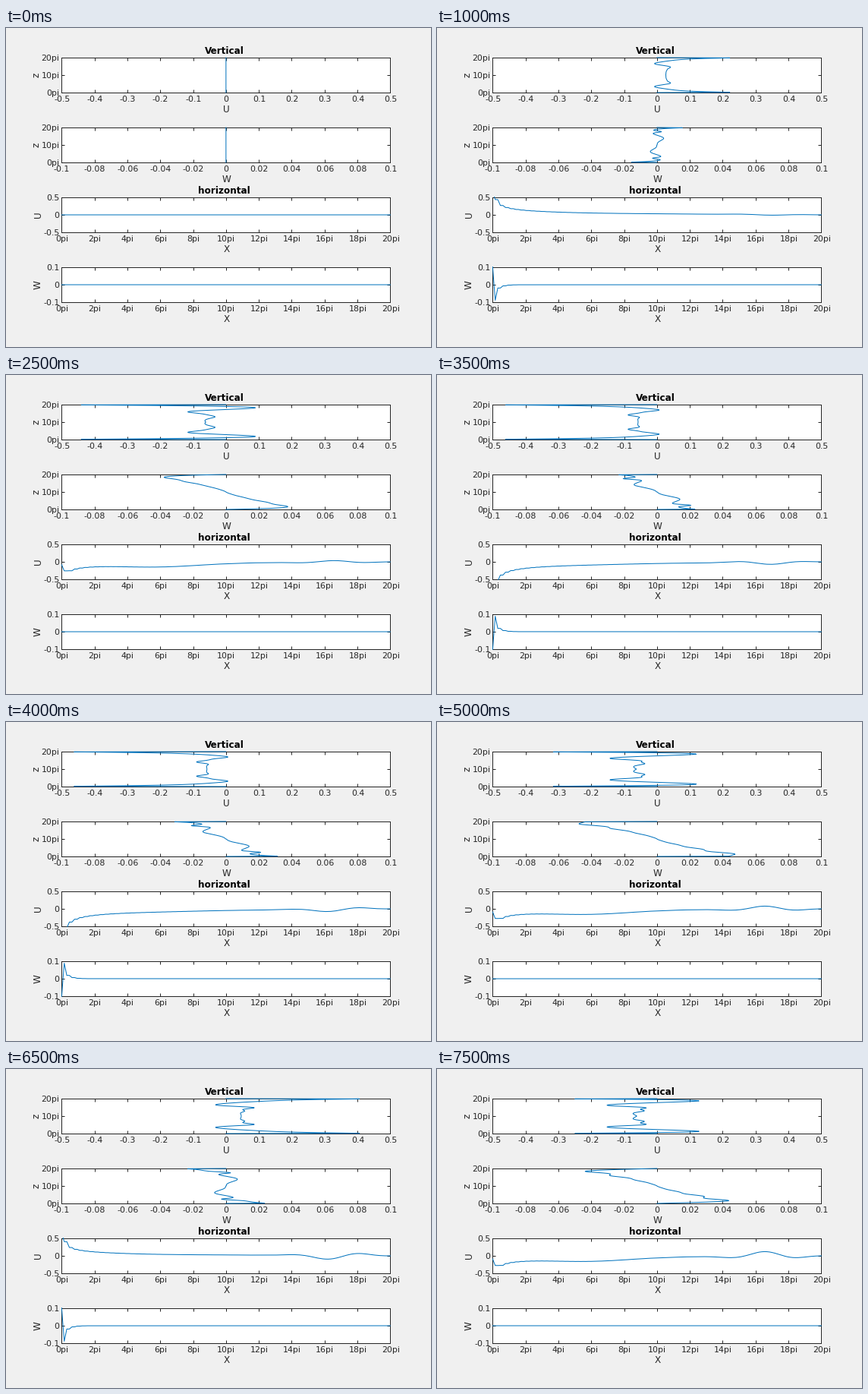
Animation of 560x420 px, one loop 8 s. Source, as a matplotlib script:

```python
import numpy as np
import matplotlib.pyplot as plt
from matplotlib.animation import FuncAnimation

W, H, DPI = 560, 420, 100
PX = 72 / DPI
INK, BLUE = '#262626', '#0072BD'
STEPS, INTERVAL, N = 16, 500, 128
LEFT, RIGHT = 73.3, 506.4
PERIOD = 10

plt.rcParams['font.family'] = 'DejaVu Sans'

index = np.arange(N)
z = np.linspace(0, 1, N)
x = np.linspace(0, 20, N)
wall = np.minimum(z, 1 - z)
side = np.where(z < 0.5, 1, -1)
inside = (wall > 0).astype(float)


def bump(at, centre, width):
    return np.exp(-((at - centre) / width) ** 2)


def wave(at, crest, length):
    return np.cos(2 * np.pi * (at - crest) / length)


def phase(t):
    """Forcing, its second harmonic and the spin-up from rest."""
    a = 2 * np.pi * t / PERIOD
    return np.sin(a), np.cos(a) ** 2, np.tanh(t / 3)


def vertical_u(t):
    force, twice, grown = phase(t)
    odd = (0.5 * np.exp(-wall / 0.035) + 0.055 - 0.075 * bump(wall, 0.16, 0.06)
           + 0.03 * bump(wall, 0.28, 0.05))
    crest = 0.05 + 0.3 / (t + 1)
    even = (0.33 * np.exp(-wall / 0.13) * wave(wall, crest, 0.25)
            - 0.3 * np.exp(-wall / 0.02) - 0.06)
    ripple = 0.0017 * t * wave(wall, 0.25, 0.12) * bump(wall, 0.26, 0.1)
    return inside * (grown * (force * odd + twice * even) + ripple)


def vertical_w(t):
    force, twice, grown = phase(t)
    core = 1 - 2 * wall
    even = 0.052 * core ** 1.3 * (1 - np.exp(-wall / 0.03))
    odd = -0.011 * bump(wall, 0.3, 0.1) - 0.012 * bump(wall, 0.12, 0.03)
    beat = -0.045 * np.cos(np.pi * t / PERIOD) * np.exp(-wall / 0.035)
    ripple = 0.0005 * t * twice * core ** 2 * wave(wall, 0.085, 0.13)
    total = grown * ((0.15 + 0.85 * twice) * even + force * odd + beat) + ripple
    return side * inside * total


def horizontal_u(t):
    force, twice, grown = phase(t)
    # Values come in pairs, which gives the small stairs near the inlet.
    pair = ((index + 1) // 2 * 2 - 0.5) * x[1]
    pair[0] = 0.12
    decay = 0.75 / np.sqrt(pair) * np.clip(1 - pair / 20, 0, 1)
    drift = np.where(index > 0, np.minimum(decay, 1), 0.3)
    near = 0.33 * force * decay - grown * (0.05 + 0.22 * twice) * drift
    trough = -0.1 * grown * twice * bump(x, 6, 3.5)
    far = (0.01 * t * wave(x + t, 16.5, PERIOD / 2) * bump(x, 17, 2.3)
           * (1 - (x / 20) ** 12))
    return near + trough + far


def horizontal_w(t):
    decay = -0.018 * 0.35 ** ((index - 2) // 2)
    decay[:2] = 0.1, -0.085
    return 1.1 * phase(t)[0] * decay


fig = plt.figure(figsize=(W / DPI, H / DPI), dpi=DPI, facecolor='#f0f0f0')


def text(px, py, s, size=12, **kw):
    kw = {'ha': 'center', 'color': INK, **kw}
    fig.text(px / W, 1 - py / H, s, fontsize=size * PX, va='baseline',
             rotation_mode='anchor', **kw)


def panel(row, xlim, ylim, xnames, ynames, xlabel, ylabel, title=None):
    top = 39 + 92 * row
    ax = fig.add_axes([LEFT / W, 1 - (top + 46) / H, (RIGHT - LEFT) / W, 46 / H])
    ax.set(xlim=xlim, ylim=ylim, xticks=np.linspace(*xlim, len(xnames)),
           yticks=np.linspace(*ylim, len(ynames)))
    ax.tick_params(direction='in', top=True, right=True, length=4.3 * PX, width=PX,
                   color=INK, labelbottom=False, labelleft=False)
    for spine in ax.spines.values():
        spine.set(color=INK, linewidth=PX)
    for px, s in zip(np.linspace(LEFT, RIGHT, len(xnames)), xnames):
        text(px + 0.3, top + 58, s, 11)
    for py, s in zip(np.linspace(top + 50, top + 4, len(ynames)), ynames):
        text(70.5, py, s, 11, ha='right')
    text(290.3, top + 71.6, xlabel)
    text(43.5 if ylabel == 'z' else 46, top + 23, ylabel, rotation=90)
    if title:
        text(287.5, top - 5, title, weight='bold', color='black')
    line, = ax.plot([], [], color=BLUE, lw=PX, snap=False, zorder=3)
    line.set_clip_box(ax.bbox.padded(0.6))
    return line


def numbers(limit, count):
    return [f'{round(v, 2) + 0:g}' for v in np.linspace(-limit, limit, count)]


pis = [f'{k}pi' for k in range(0, 21, 2)]
heights = ['0pi', '10pi', '20pi']
lines = [
    panel(0, (-.5, .5), (0, 1), numbers(.5, 11), heights, 'U', 'z', 'Vertical'),
    panel(1, (-.1, .1), (0, 1), numbers(.1, 11), heights, 'W', 'z'),
    panel(2, (0, 20), (-.5, .5), pis, numbers(.5, 3), 'X', 'U', 'horizontal'),
    panel(3, (0, 20), (-.1, .1), pis, numbers(.1, 3), 'X', 'W'),
]


def draw(t):
    lines[0].set_data(vertical_u(t), z)
    lines[1].set_data(vertical_w(t), z)
    lines[2].set_data(x, horizontal_u(t))
    lines[3].set_data(x, horizontal_w(t))
    return lines


anim = FuncAnimation(fig, draw, frames=STEPS, interval=INTERVAL,
                     init_func=lambda: draw(0), repeat=True, repeat_delay=0)
plt.show()
```
